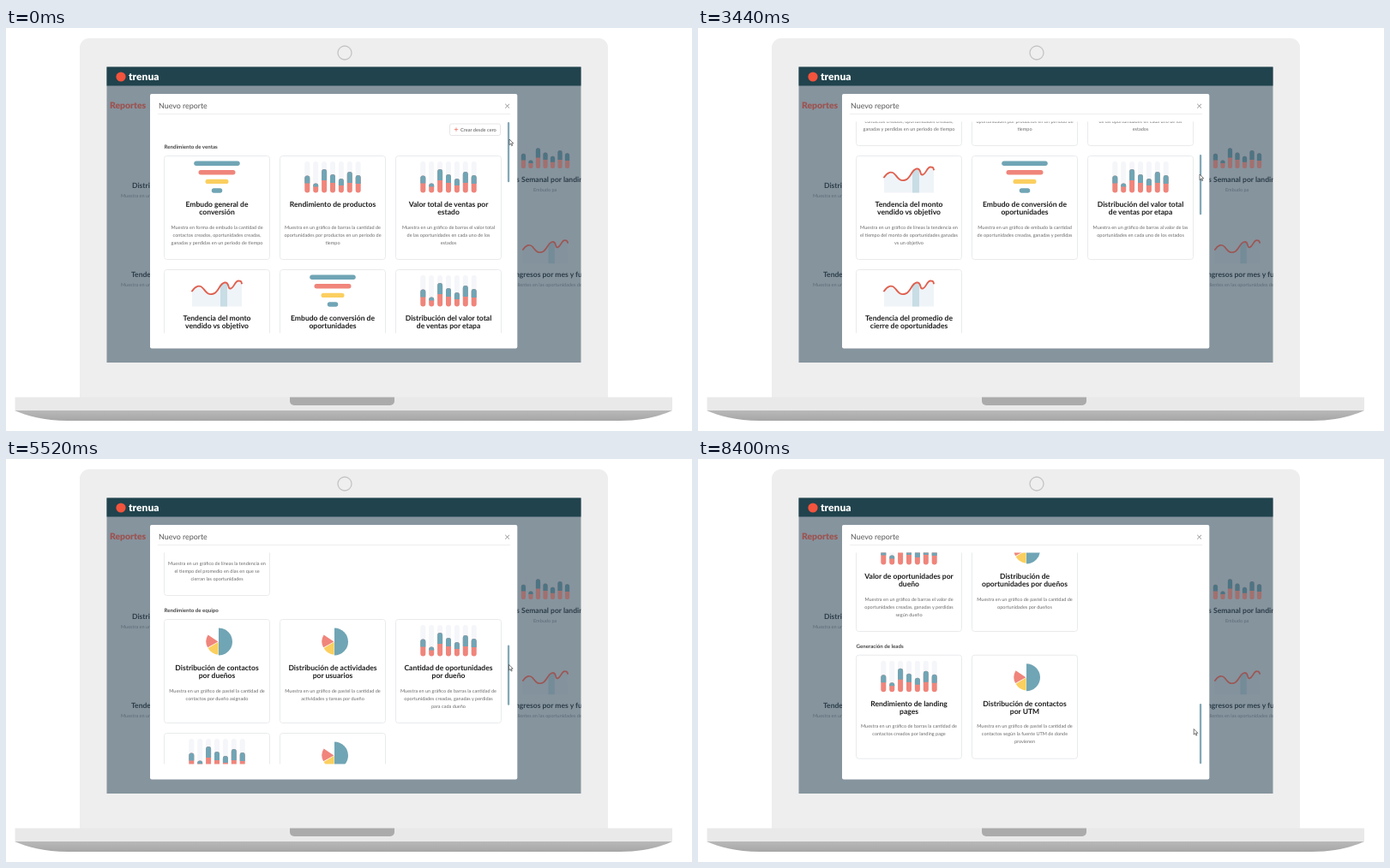
These frames come from a looping animation (800 by 471 pixels, 8.44 s). An HTML page:

```html
<!DOCTYPE html>
<html lang="es">
<head>
<meta charset="utf-8">
<title>Nuevo reporte</title>
<style>
  html, body { margin: 0; width: 100%; height: 100%; overflow: hidden; background: #fff; }
  svg { display: block; width: 800px; height: 471px; }
  text { font-family: Lato, "Open Sans", sans-serif; text-rendering: geometricPrecision; }
  .mid { text-anchor: middle; }
  .title { font-size: 8.55px; font-weight: 700; fill: #1c1c1c; }
  .desc { font-size: 5.54px; fill: #6a6a6a; }
  .section { font-size: 6.15px; font-weight: 700; fill: #444; }
  .dim .title { fill: #2c3d48; }
  .dim .desc { fill: #5b6b76; }
</style>
</head>
<body>
<svg viewBox="0 0 800 471" xmlns="http://www.w3.org/2000/svg">
  <defs>
    <clipPath id="screen"><rect x="117.5" y="45.5" width="553" height="345.5"/></clipPath>
    <clipPath id="view"><rect x="168" y="109.5" width="428" height="247"/></clipPath>
    <linearGradient id="under" x2="0" y2="1">
      <stop stop-color="#b9b9b9"/><stop offset="1" stop-color="#a6a6a6"/>
    </linearGradient>
  </defs>

  <path d="M86 432V23a11 11 0 0 1 11-11H691a11 11 0 0 1 11 11V432Z" fill="#eee"/>
  <circle cx="395" cy="29" r="8" fill="#efefef" stroke="#c4c4c4" stroke-width="1.3"/>
  <path d="M10 447H777C764 453 744 459 716 459H72C44 459 24 453 10 447Z" fill="url(#under)"/>
  <path d="M10.5 431.5H777V447H10.5Z" fill="#e9e9e9"/>
  <path d="M331 431.5H453V436a5 5 0 0 1-5 5H336a5 5 0 0 1-5-5Z" fill="#ababab"/>

  <g clip-path="url(#screen)">
    <rect x="117" y="45" width="554" height="346" fill="#86949e"/>
    <g id="page" class="dim" style="filter:blur(.45px)"></g>
    <rect x="117" y="45" width="554" height="22.5" fill="#20434d"/>
    <circle cx="134" cy="57" r="5.6" fill="#f4533c"/>
    <text x="143" y="61" font-size="12" font-weight="900" fill="#fff">trenua</text>
  </g>

  <rect x="168" y="77" width="428.3" height="297.5" rx="2" fill="#fff"/>
  <text x="178" y="94" font-size="8.9" fill="#555">Nuevo reporte</text>
  <path d="M582.2 88.8l4.8 4.8m0-4.8l-4.8 4.8" stroke="#888" stroke-width=".9"/>
  <path d="M177 100.5H588" stroke="#eee"/>

  <g clip-path="url(#view)"><g id="list"></g></g>
  <rect id="thumb" x="584.9" y="110" width="2.3" height="70.3" rx="1.1" fill="#84a8b8"/>
  <path id="cursor" d="M0 0V6.6L1.6 5.2L2.7 7.7L3.7 7.2L2.6 4.8H4.7Z" fill="#fff" stroke="#333" stroke-width=".65"/>
</svg>

<script>
const $ = id => document.getElementById(id);
const bright = { teal: '#70a5b5', coral: '#f0857b', gold: '#fbcf5f', line: '#e0604f', ghost: '#f5f6f9', area: '#eff4f8', band: '#c8dde5' };
const dull = { teal: '#4d7483', coral: '#a2706f', gold: '#a2905f', line: '#9c5654', ghost: '#86949e', area: '#83929c', band: '#748b98' };

const text = (cls, x, y, s) => `<text class="${cls}" x="${x}" y="${y}">${s}</text>`;
const pill = (x, y, w, h, fill) => `<rect x="${x}" y="${y}" width="${w}" height="${h}" rx="${Math.min(w, h) / 2}" fill="${fill}"/>`;

// Icons are centred on x = 0, with y measured from the top of the card.
const icons = {
  funnel: c => [[53.5, 'teal'], [43, 'coral'], [27, 'gold'], [12.5, 'teal']]
    .map(([w, k], i) => pill(-w / 2, 6 + i * 10.6, w, 5.4, c[k])).join(''),

  bars: c => [[20, 9], [11, 4], [27.5, 13], [21.5, 10], [16.5, 8], [24.5, 13], [20.5, 10]]
    .map(([h, cap], i) => {
      const x = i * 9.9 - 32.7, top = 43 - h;
      return pill(x, 6.5, 6, 36.5, c.ghost) + pill(x, top, 6, h, c.coral) +
        `<path d="M${x} ${top + cap}V${top + 3}a3 3 0 0 1 6 0V${top + cap}Z" fill="${c.teal}"/>`;
    }).join(''),

  line: c => {
    const curve = 'M-29 25C-25 19-20 17-16 22S-10 30-4 28S3 16 9 15S12 23 16 22S21 13 25 13S28 14 29 16';
    return `<path d="${curve}V43H-29Z" fill="${c.area}"/><rect x="4" y="16" width="8" height="27" fill="${c.band}"/>
      <path d="${curve}" fill="none" stroke="${c.line}" stroke-width="1.9" stroke-linecap="round"/>`;
  },

  pie: c => `<g transform="translate(2 26)"><path d="M0-16A16 16 0 0 1 0 16Z" fill="${c.teal}"/>
    <path d="M-.6 0L-12.4-8A14.6 14.6 0 0 0-12.8 6.8Z" fill="${c.coral}"/>
    <path d="M-.4 .6V15.2A14.6 14.6 0 0 1-12.4 7.6Z" fill="${c.gold}"/></g>`
};

const lines = (cls, y, s) => s.split('|').map((l, i) => text(cls + ' mid', 0, y + i * 9, l)).join('');

const card = ([col, y, icon, title, desc]) => `<g transform="translate(${246 + col * 135} ${y})">
  <rect x="-61.5" width="123" height="121" rx="3" fill="#fff" stroke="#e6e8ea" stroke-width=".9"/>
  ${icons[icon](bright)}${lines('title', 59.5, title)}${lines('desc', 85.2, desc)}</g>`;

const bar = 'Muestra en un gráfico de barras ', pie = 'Muestra en un gráfico de pastel la cantidad de|', trend = 'Muestra en un gráfico de líneas la tendencia en|';
const cards = [
  [0, 149.5, 'funnel', 'Embudo general de|conversión', 'Muestra en forma de embudo la cantidad de|contactos creados, oportunidades creadas,|ganadas y perdidas en un periodo de tiempo'],
  [1, 149.5, 'bars', 'Rendimiento de productos', bar + 'la cantidad de|oportunidades por productos en un periodo de|tiempo'],
  [2, 149.5, 'bars', 'Valor total de ventas por|estado', bar + 'el valor total|de las oportunidades en cada uno de los|estados'],
  [0, 282.5, 'line', 'Tendencia del monto|vendido vs objetivo', trend + 'el tiempo del monto de oportunidades ganadas|vs un objetivo'],
  [1, 282.5, 'funnel', 'Embudo de conversión de|oportunidades', 'Muestra en un gráfico de embudo la cantidad|de oportunidades creadas, ganadas y perdidas'],
  [2, 282.5, 'bars', 'Distribución del valor total|de ventas por etapa', bar + 'al valor de las|oportunidades en cada uno de los estados'],
  [0, 415.5, 'line', 'Tendencia del promedio de|cierre de oportunidades', trend + 'el tiempo del promedio en días en que se|cierran las oportunidades'],
  [0, 564.5, 'pie', 'Distribución de contactos|por dueños', pie + 'contactos por dueño asignado'],
  [1, 564.5, 'pie', 'Distribución de actividades|por usuarios', pie + 'actividades y tareas por dueño'],
  [2, 564.5, 'bars', 'Cantidad de oportunidades|por dueño', bar + 'la cantidad de|oportunidades creadas, ganadas y perdidas|para cada dueño'],
  [0, 697.5, 'bars', 'Valor de oportunidades por|dueño', bar + 'el valor de|oportunidades creadas, ganadas y perdidas|según dueño'],
  [1, 697.5, 'pie', 'Distribución de|oportunidades por dueños', pie + 'oportunidades por dueños'],
  [0, 846.2, 'bars', 'Rendimiento de landing|pages', bar + 'la cantidad de|contactos creados por landing page'],
  [1, 846.2, 'pie', 'Distribución de contactos|por UTM', pie + 'contactos según la fuente UTM de donde|provienen']
];

$('list').innerHTML = `
  <rect x="517.5" y="112" width="59" height="13.5" rx="2" fill="#fff" stroke="#e4e4e4" stroke-width=".9"/>
  <path d="M522.8 118.6h4.4m-2.2-2.2v4.4" stroke="#ee7468" stroke-width=".8"/>
  <text x="530" y="120.5" font-size="5.65" fill="#555">Crear desde cero</text>` +
  text('section', 184.5, 141, 'Rendimiento de ventas') +
  text('section', 184.5, 556, 'Rendimiento de equipo') +
  text('section', 184.5, 837.6, 'Generación de leads') +
  cards.map(card).join('');

$('page').innerHTML = `<text x="121" y="93.5" font-size="10.4" font-weight="900" fill="#9c5350">Reportes</text>` +
  text('title', 147, 187, 'Distribución') + text('desc', 134, 198, 'Muestra en un gráfico') +
  text('title', 146, 291, 'Tendencia') + text('desc', 134, 302, 'Muestra en un gráfico') +
  text('title', 593, 180, 'ls Semanal por landing') + text('desc', 615, 191, 'Embudo pa') +
  text('title', 594, 291, 'ngresos por mes y fuente') + text('desc', 594, 302, 'clientes en las oportunidades de') +
  `<g transform="translate(629 127) scale(.86)">${icons.bars(dull)}</g>
   <g transform="translate(629 236.5) scale(.9)">${icons.line(dull)}</g>`;

// Monotone cubic through [time, value] points, flat at both ends.
function track(keys) {
  const rate = i => (keys[i + 1][1] - keys[i][1]) / (keys[i + 1][0] - keys[i][0]);
  const slope = keys.map((_, i) => {
    if (!i || i === keys.length - 1) return 0;
    const a = rate(i - 1), b = rate(i);
    return a * b > 0 ? 2 * a * b / (a + b) : 0;
  });
  return t => {
    if (t >= keys[keys.length - 1][0]) return keys[keys.length - 1][1];
    const i = keys.findIndex((k, n) => t < keys[n + 1][0]);
    const [t0, a] = keys[i], [t1, b] = keys[i + 1], d = t1 - t0, u = (t - t0) / d, v = 1 - u;
    return v * v * ((1 + 2 * u) * a + u * d * slope[i]) + u * u * ((3 - 2 * u) * b - v * d * slope[i + 1]);
  };
}

const LOOP = 8440, STEP = 40;
const scroll = track([[0, 0], [1280, 0], [2080, 26], [3440, 133], [4240, 223], [5520, 377], [6960, 536], [7880, 617], [LOOP, 617]]);
const cursorX = track([[0, 587], [1280, 586], [2080, 585], [3440, 585], [4240, 581.5], [5520, 586.5], [6960, 581.7], [8240, 578.2]]);
const cursorY = track([[0, 130], [1280, 131], [2080, 139], [3440, 171], [4240, 197], [5520, 240.3], [6960, 287], [8240, 315.5]]);

const move = (el, x, y) => el.setAttribute('transform', `translate(${x.toFixed(2)} ${y.toFixed(2)})`);
const list = $('list'), thumb = $('thumb'), cursor = $('cursor');
const start = performance.now();

function draw() {
  const t = Math.floor((performance.now() - start) % LOOP / STEP) * STEP;
  const y = scroll(t);
  move(list, 0, -y);
  move(thumb, 0, y * 176 / 617);
  move(cursor, cursorX(t), cursorY(t));
  requestAnimationFrame(draw);
}
draw();
</script>
</body>
</html>
```
